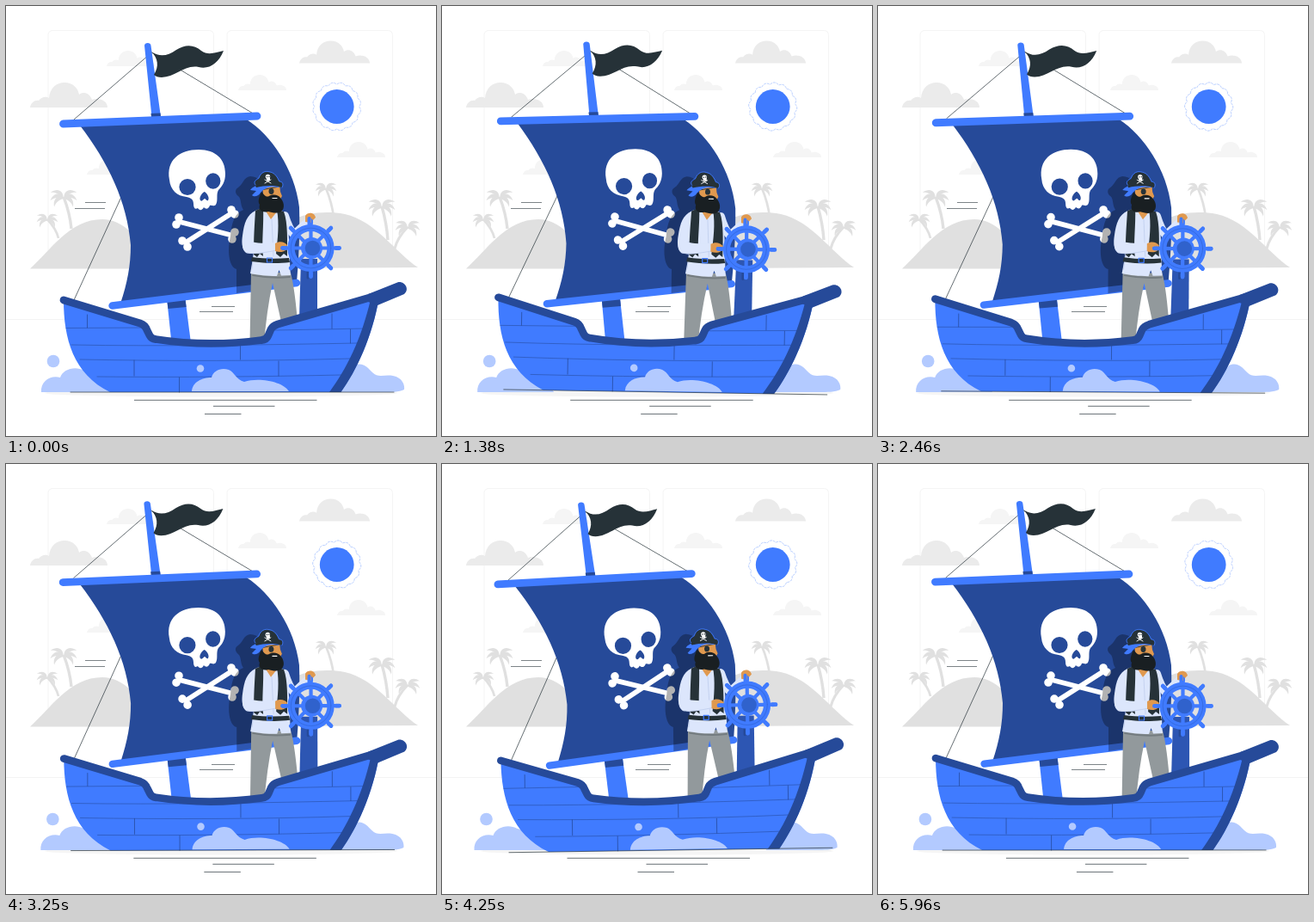
An HTML page with a canvas that plays this animation: 500x500 px, repeating every 6 s.

```html
<!DOCTYPE html>
<html lang="en">
<head>
<meta charset="utf-8">
<title>Pirate ship</title>
<style>
html, body { margin: 0; width: 100%; height: 100%; overflow: hidden; background: #fff; }
canvas { display: block; width: 500px; height: 500px; }
</style>
</head>
<body>
<canvas id="stage" width="500" height="500"></canvas>
<script>
const ctx = document.getElementById('stage').getContext('2d');
const LOOP = 6000, TAU = Math.PI * 2;
const BLUE = '#407bff', NAVY = '#264a99', MID = '#3062cc', POST = '#2d56b3', FOAM = '#b3caff';
const INK = '#263238', SHIRT = '#dce6fc', SKIN = '#e0994f', LAND = '#e0e0e0';

const fill = (d, color) => { ctx.fillStyle = color; ctx.fill(new Path2D(d)); };

function stroke(d, color, width = 0.7) {
  ctx.strokeStyle = color;
  ctx.lineWidth = width;
  ctx.stroke(new Path2D(d));
}

function dot(x, y, r, color, ry = r) {
  ctx.fillStyle = color;
  ctx.beginPath();
  ctx.ellipse(x, y, r, ry, 0, 0, TAU);
  ctx.fill();
}

function group(draw, x = 0, y = 0, angle = 0, sx = 1, sy = sx) {
  ctx.save();
  ctx.translate(x, y);
  ctx.rotate(angle);
  ctx.scale(sx, sy);
  draw();
  ctx.restore();
}

// Linear interpolation through [position, value] stops
function track(stops, p) {
  const i = Math.max(1, stops.findIndex(s => s[0] >= p));
  const [a, va] = stops[i - 1], [b, vb] = stops[i];
  return va + (vb - va) * (p - a) / (b - a);
}

const SWAY = [[0, 0], [0.25, 1], [0.75, -1], [1, 0]];
const DRIFT = [[0, 0], [0.1, -1], [0.2, 2], [0.3, -4], [0.4, 4], [0.5, -4],
  [0.6, 4], [0.7, -4], [0.8, 2], [0.9, -1], [1, 0]];

function cloud(x, base, w, h, color) {
  group(() => fill('M0 29C1 23 6 20 10 21C14 16 19 16 22 18C23 6 31 0 40 0C50 0 56 7 57 14C62 10 69 12 72 20C80 17 90 21 90 29Z', color),
    x, base - h, 0, w / 90, h / 29);
}

function palm(x, y, footX, footY, size) {
  stroke(`M${x} ${y}Q${x + (footX - x) * 0.8} ${(y + footY) / 2} ${footX} ${footY}`, LAND, 3.4 * size);
  for (const [angle, flip] of [[-0.45, 1], [0.15, 1], [0.7, 1], [0.45, -1], [-0.15, -1], [-0.7, -1]]) {
    group(() => fill('M0 1C3 -6 11 -7 16 2C11 -1 6 -1 0 2Z', LAND), x, y, angle, flip * size, size);
  }
}

function backdrop() {
  ctx.strokeStyle = '#f4f4f4';
  ctx.lineWidth = 1;
  for (const x of [49, 257]) {
    ctx.beginPath();
    ctx.roundRect(x, 28.5, 192.5, 272, 5);
    ctx.stroke();
  }
  stroke('M0 364.5H500', '#ebebeb', 0.6);
  cloud(28, 118, 90, 29, '#ebebeb');
  cloud(341, 66.5, 82, 26, '#ebebeb');
  cloud(117, 70, 56, 18, '#f5f5f5');
  cloud(270, 98, 56, 18, '#f5f5f5');
  cloud(385, 176, 56, 18, '#f5f5f5');
  cloud(94, 196, 56, 18, '#f5f5f5');
  palm(67, 222, 76, 259, 1);
  palm(48, 248, 61, 270, 0.8);
  palm(372, 212, 381, 246, 0.8);
  palm(437, 233, 444, 272, 1);
  palm(467, 257, 452, 282, 0.92);
  fill('M28 305.5C52 284 74 248 112 248C136 248 158 270 170 305.5Z', LAND);
  fill('M330 250C350 240 372 238 394 242C430 250 452 286 479 304L330 305Z', LAND);
  stroke('M92 228.5H116M80 235.5H115M239 349.5H266M225 355.5H264', INK, 0.6);
}

function sun(p) {
  dot(384.7, 117, 19.9, BLUE);
  group(() => {
    ctx.beginPath();
    for (let i = 0; i <= 256; i++) {
      const a = i / 256 * TAU, r = 26 + 2.1 * Math.abs(Math.sin(a * 8));
      ctx.lineTo(Math.cos(a) * r, Math.sin(a) * r);
    }
    ctx.setLineDash([3, 0.9]);
    ctx.strokeStyle = '#8fb1ff';
    ctx.lineWidth = 0.6;
    ctx.stroke();
  }, 384.7, 117, p * TAU);
}

function water() {
  fill('M41 449C40 437 51 429 63 432C66 422 81 418 91 424C108 428 124 440 130 449Z', FOAM);
  dot(55, 413, 7.3, FOAM);
  fill('M380 449L405 418C415 413 421 421 426 426C433 433 440 428 450 430C461 432 464 441 463 446C457 449 448 449 438 449Z', FOAM);
  stroke('M149 458.3H361.5M241 465.3H312.5M231 474.4H273.5', INK, 0.7);
}

function rigging() {
  stroke('M166 57L79 132M169 54L289 126M135 220L79 342', INK, 0.7);
  fill('M161 46C161 42 168.5 42 168.5 46L180 129H169.5Z', BLUE);
  fill('M168.5 125L179.5 124.5L180 129H169Z', NAVY);
  fill('M169 53C179 60 188 58 198 51C209 44 219 45 227 52C235 58 244 54 253 52C247 67 236 74 224 71C207 68 197 83 181 83C177 83 174 82 172 80C178 70 177 61 169 53Z', INK);
  fill('M187 340L208 337L215 392H192.5Z', BLUE);
  fill('M187 340L208 337L209.6 350L188.5 352Z', NAVY);
}

function bone(x1, y1, x2, y2, knobs) {
  stroke(`M${x1} ${y1}L${x2} ${y2}`, '#fff', 5.8);
  for (const [x, y] of knobs) dot(x, y, 4.8, '#fff');
}

function skull() {
  fill('M190 202C186 179 202 167 224 167C244 167 255 178 255 195C255 205 251 210 247 214C244 219 247 226 244 231C241 234 239 231 237 232C235 237 232 236 230 234C228 238 225 238 223 235C220 237 218 235 218 230C218 225 215 223 210 222C199 221 191 214 190 202Z', '#fff');
  dot(211, 210.5, 9.6, NAVY);
  dot(240.8, 203.5, 8.6, NAVY, 9.2);
  fill('M231 216C234 218 237 223 235 226C233 227 232 224 231 224C229 225 228 228 226 226C224 223 228 217 231 216Z', NAVY);
}

function sail() {
  fill('M86 139L280 132C308 150 336 190 341 234C342 268 340 298 338 322L133 346C141 322 145 302 145 278C141 228 119 182 86 139Z', NAVY);
  stroke('M66.5 137L292 128', BLUE, 8.8);
  skull();
  bone(202, 251, 264, 267, [[201, 246], [198, 254], [266, 263], [263, 271]]);
  bone(209, 275, 264, 240, [[205, 273], [211, 280], [262, 237], [266, 242]]);
  stroke('M123.5 348.5L338 322', BLUE, 8.4);
  ctx.save();
  ctx.clip(new Path2D('M255 190H340V323L255 336Z'));
  fill('M268 340L268 306C259 304 257 284 261 268C262 252 266 241 276 237C272 231 274 224 270 221C266 218 266 213 270 211C276 207 276 199 284 198C294 198 300 207 302 216L310 340Z', 'rgba(0,0,0,.3)');
  ctx.restore();
}

function helm() {
  fill('M343 294H362L362 360L341 364Z', POST);
  stroke('M351 302V316', NAVY, 3);
}

function wheel() {
  const spokes = (a, b, width) => {
    for (let i = 0; i < 8; i++) {
      group(() => stroke(`M${a} 0H${b}`, BLUE, width), 0, 0, i * TAU / 8);
    }
  };
  group(() => {
    spokes(6, 33, 4.2);
    spokes(29, 33, 4.8);
    ctx.strokeStyle = BLUE;
    ctx.lineWidth = 8.2;
    ctx.beginPath();
    ctx.ellipse(0, 0, 23, 23.5, 0, 0, TAU);
    ctx.stroke();
    ctx.strokeStyle = MID;
    ctx.lineWidth = 0.6;
    ctx.beginPath();
    ctx.arc(0, 0, 23.3, 0, TAU);
    ctx.stroke();
    dot(1, 0, 12.5, BLUE);
    dot(2, 0, 8.8, MID);
  }, 354.5, 281.5);
}

function pirate() {
  fill('M285 310H331C335 326 337 345 339 366L321 372L310 322C305 345 302 368 300 392H283.5Z', '#92999c');
  stroke('M287 313Q308 317 330 315', '#747c80', 2);
  stroke('M324 244Q329 260 335 266L349 253', SHIRT, 10);
  fill('M290 238C298 234 316 234 324 240C330 252 329 285 331 313L320 313.5L317.5 307L315 314C303 314 294 313 284 311L288 288C276 288 273 280 275 267C277 252 280 243 290 238Z', SHIRT);
  fill('M301 237L308 248L316 238L310 232Z', SKIN);
  stroke('M309 248L311 291M288 286L286 306M281 276L289 274', '#b5c5e8', 0.6);
  fill('M290 238L299 234C300 255 297 274 299 291L295 288L292 292L288 289C288 269 289 254 290 238Z', INK);
  fill('M315 237L323 239C328 252 327 275 327 291L323 288L319 292L314 288C316 270 318 253 315 237Z', INK);
  fill('M286 292C300 294 314 294 329 293L330 298C314 300 300 299 285 297Z', INK);
  ctx.strokeStyle = BLUE;
  ctx.lineWidth = 1.2;
  ctx.strokeRect(303.5, 293, 6, 5);
  fill('M277 270C283 275 297 277 313 275L315 284C302 288 286 289 279 287C274 283 274 276 277 270Z', SHIRT);
  stroke('M280 287C290 289 304 286 315 284', '#b5c5e8', 0.6);
  fill('M313 276C318 273 324 274 327 278L325 284C321 287 317 286 313 285Z', SKIN);
  // head
  fill('M298 209L318 207L319 216L321 221L317 228H300Z', SKIN);
  fill('M297 216C300 219 302 223 306 221C311 218 317 220 319 223C323 227 325 235 320 239C315 242 309 240 305 239C298 241 293 237 295 231C292 227 295 221 297 216Z', '#191f22');
  stroke('M310 223.5L315 223.5', '#fff', 1.2);
  dot(308.5, 215.5, 3, INK, 3.4);
  stroke('M296 214L318 210', INK, 0.9);
  fill('M292 207L319 206L317 211C308 209 301 211 296 217C293 222 288 222 286 220L291 215L284 214C287 210 289 211 292 207Z', BLUE);
  fill('M291 211C287 204 291 203 294 201C296 194 301 191 307 193C313 194 316 200 317 204C321 204 323 207 321 211C311 208 300 209 291 211Z', INK);
  stroke('M290 208C287 204 291 202 294 200C296 194 301 191 307 193C313 194 316 200 318 204C322 204 323 208 321 211', BLUE, 0.9);
  dot(304.5, 198.5, 2.7, '#fff');
  fill('M303 200H307V203H303Z', '#fff');
  dot(303.6, 198.6, 0.7, INK);
  dot(306, 198.4, 0.7, INK);
  stroke('M301 202L308 206M308 202L301 206', '#fff', 0.9);
}

function hull() {
  fill('M67 342L161 371L168 387C215 396 260 395 303 388L311 373L434 338C426 385 407 425 389 449H121C78 428 67 386 67 342Z', BLUE);
  stroke('M70 374.5L163 374M76 394C180 396 300 394 409 392M86 411C190 413 300 413 400 410M106 431C200 432 300 431 390 429M313 377L418 375', NAVY, 0.55);
  stroke('M94.5 359V374M149 412V430M201.5 432V449M272.5 395V411M317 413V430M379 358V375M400.5 376V392', NAVY, 0.75);
  fill('M424 341L434 338C426 385 407 425 389.5 449H376C396 422 413 388 424 341Z', NAVY);
  stroke('M67 342L156 369Q162 371 164 377L167 383Q169 387 174 387.5C216 394 256 394 297 388.5Q303 388 305 383L308 376Q310 372 316 370L430 337', NAVY, 8.8);
  fill('M421 335L455 321.5C463 319 470 329 463 335L432 348L421 344Z', NAVY);
  stroke('M75 449H451', INK, 0.7);
  fill('M216 448C217 437 228 432 239 432C241 424 250 420 259 423C266 426 267 434 277 437C294 431 323 437 329 448Z', FOAM);
  dot(226, 421.5, 4.3, FOAM);
}

function ship() {
  rigging();
  sail();
  helm();
  pirate();
  wheel();
  fill('M348 244C351 239 359 240 360 246L357 249L355 247V252L348 251Z', SKIN);
  stroke('M352.5 247V255', BLUE, 4);
  hull();
}

function frame(now) {
  const p = now % LOOP / LOOP;
  ctx.lineCap = 'butt';
  ctx.fillStyle = '#fff';
  ctx.fillRect(0, 0, 500, 500);
  backdrop();
  sun(p);
  dot(250, 450, 205, '#f5f5f5', 4.5);
  group(water, track(DRIFT, p));
  ctx.lineCap = ctx.lineJoin = 'round';
  group(() => {
    ctx.translate(-264.5, -246.5);
    ship();
  }, 264.5, 246.5, track(SWAY, p) * Math.PI / 180);
  requestAnimationFrame(frame);
}
requestAnimationFrame(frame);
</script>
</body>
</html>
```
